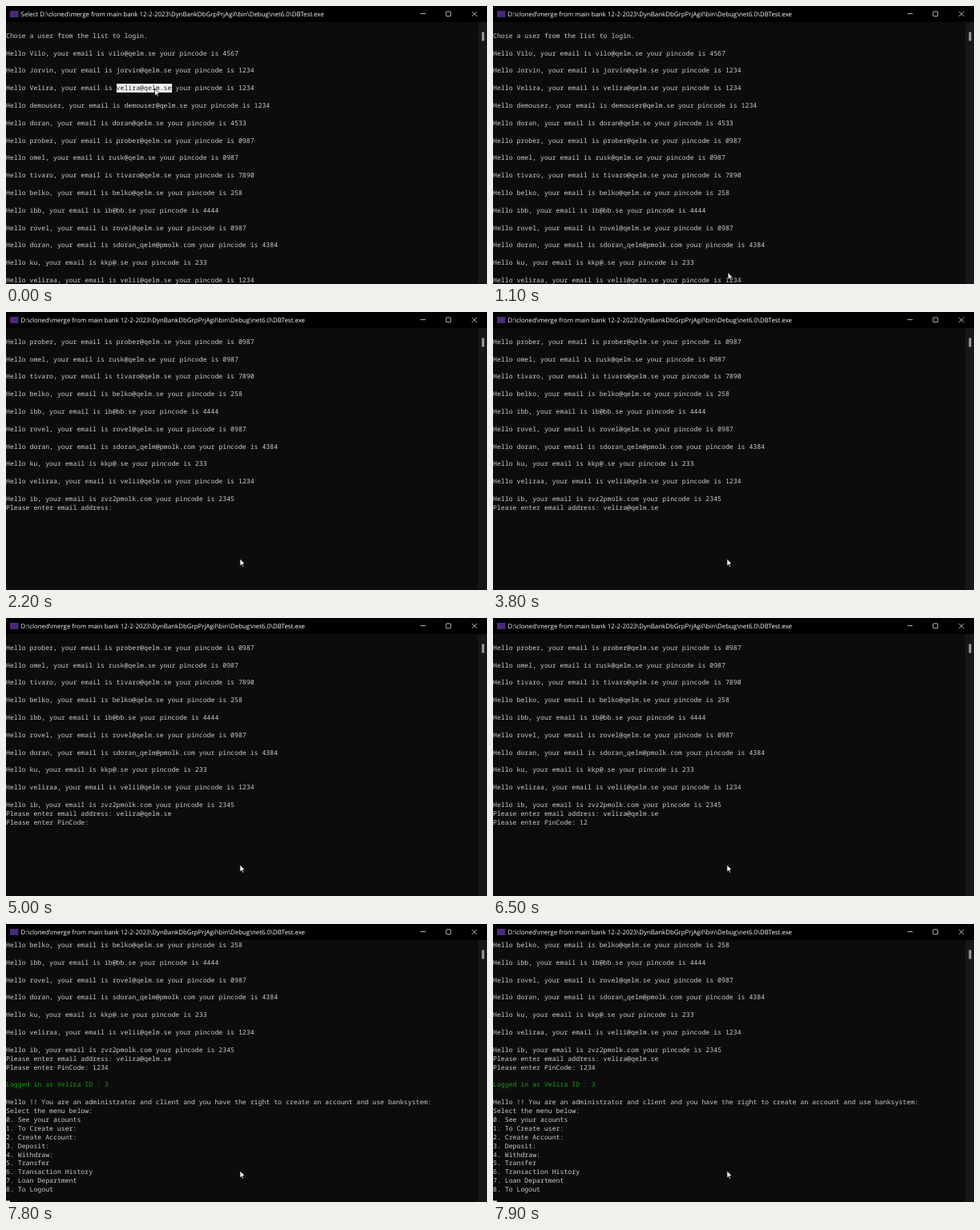
Animation of 600 by 347 pixels, one loop 8 s. Source, as an HTML page with a canvas:

```html
<!DOCTYPE html>
<html lang="en">
<head>
<meta charset="utf-8">
<title>Console login</title>
<style>
html, body { margin: 0; width: 100%; height: 100%; overflow: hidden; background: #0c0c0c; }
canvas { display: block; }
</style>
</head>
<body>
<canvas id="stage" width="600" height="347"></canvas>
<script>
const ctx = document.getElementById('stage').getContext('2d');
const LOOP = 8000, TICK = 100;
const COL = 4.914, ROW = 10.9, TOP = 20.4, BASE = 8.5, ROWS = 30;
const INK = '#cccccc', GREEN = '#13a10e';
const PATH = 'D:\\cloned\\merge from main bank 12-2-2023\\DynBankDbGrpPrjAgil\\bin\\Debug\\net6.0\\DBTest.exe';
const EMAIL = 'velira@qelm.se';
const MAIL_ROW = 32, PIN_ROW = 33, LOGIN_ROW = 35, MENU_ROW = 37;
const MAIL_ASK = 'Please enter email address: ', PIN_ASK = 'Please enter PinCode: ';

const users = [
  ['Vilo', 'vilo@qelm.se', '4567'],
  ['Jorvin', 'jorvin@qelm.se', '1234'],
  ['Velira', EMAIL, '1234'],
  ['demouser', 'demouser@qelm.se', '1234'],
  ['doran', 'doran@qelm.se', '4533'],
  ['prober', 'prober@qelm.se', '0987'],
  ['omel', 'rusk@qelm.se', '0987'],
  ['tivaro', 'tivaro@qelm.se', '7890'],
  ['belko', 'belko@qelm.se', '258'],
  ['ibb', 'ib@bb.se', '4444'],
  ['rovel', 'rovel@qelm.se', '0987'],
  ['doran', 'sdoran_qelm@pmolk.com', '4384'],
  ['ku', 'kkp@.se', '233'],
  ['veliraa', 'velii@qelm.se', '1234'],
  ['ib', 'zvz2pmolk.com', '2345']
];

const menu = [
  'Hello !! You are an administrator and client and you have the right to create an account and use banksystem:',
  'Select the menu below:',
  '0. See your acounts',
  '1. To Create user:',
  '2. Create Account:',
  '3. Deposit:',
  '4. Withdraw:',
  '5. Transfer',
  '6. Transaction History',
  '7. Loan Department',
  '8. To Logout'
];

// Each step: [start ms, value]
const scrollSteps = [[0, 0], [1600, 3], [1700, 6], [1900, 9], [2000, 12], [7600, 8], [7800, 19]];
const pinSteps = [[0, 0], [6000, 1], [6400, 2], [6800, 3], [7000, 4]];
// Caret is visible within these spans
const caretSpans = [[1700, 2200], [2800, 3300], [3400, 3800], [4400, 4900],
  [6000, 6200], [6400, 6500], [6800, 7000], [7600, 8000]];
// Mouse path: [ms, x, y]
const mouse = [[0, 185.5, 103], [100, 185.5, 103], [1100, 293, 332.5], [1400, 293, 332.5],
  [1900, 295.3, 313], [2200, 291.8, 308], [LOOP, 291.8, 308]];

const stepAt = (steps, t) => steps.filter(s => s[0] <= t).pop()[1];

function mouseAt(t) {
  const i = mouse.findIndex(p => p[0] > t);
  const [a, b] = [mouse[i - 1], mouse[i]];
  const u = (t - a[0]) / (b[0] - a[0]);
  const e = u * u * (3 - 2 * u);
  return [a[1] + (b[1] - a[1]) * e, a[2] + (b[2] - a[2]) * e];
}

function rect(x, y, w, h, color) {
  ctx.fillStyle = color;
  ctx.fillRect(x, y, w, h);
}

function write(text, row, color = INK, col = 0) {
  ctx.fillStyle = color;
  const y = TOP + row * ROW + BASE;
  [...text].forEach((ch, i) => {
    if (ch !== ' ') ctx.fillText(ch, (col + i) * COL, y);
  });
}

function screenLines(t) {
  const lines = [];
  const put = (row, text, color) => { lines[row] = { text, color }; };
  put(1, 'Chose a user from the list to login.');
  users.forEach(([name, mail, pin], i) =>
    put(3 + 2 * i, `Hello ${name}, your email is ${mail} your pincode is ${pin}`));
  put(MAIL_ROW, MAIL_ASK + (t >= 3400 ? EMAIL : ''));
  if (t >= 5000) put(PIN_ROW, PIN_ASK + '1234'.slice(0, stepAt(pinSteps, t)));
  if (t >= 7600) put(LOGIN_ROW, 'Logged in as Velira ID : 3', GREEN);
  if (t >= 7800) menu.forEach((text, i) => put(MENU_ROW + i, text));
  return lines;
}

function caretAt(t, lines) {
  if (t >= 7800) return [MENU_ROW + menu.length, 0];
  if (t >= 7600) return [MENU_ROW, 0];
  const row = t >= 5000 ? PIN_ROW : MAIL_ROW;
  return [row, lines[row].text.length];
}

function drawConsole(t) {
  const top = stepAt(scrollSteps, t);
  const lines = screenLines(t);
  ctx.font = '500 8.19px "Noto Sans Mono", "DejaVu Sans Mono", monospace';
  for (let r = 0; r < ROWS; r++) {
    const line = lines[top + r];
    if (line) write(line.text, r, line.color);
  }
  if (t < 200) {
    rect(Math.round(28 * COL), Math.round(TOP + 7 * ROW), Math.round(EMAIL.length * COL), 11, '#f3f3f3');
    write(EMAIL, 7, '#222222', 28);
  }
  if (caretSpans.some(([a, b]) => t >= a && t < b)) {
    const [row, col] = caretAt(t, lines);
    rect(col * COL, TOP + (row - top) * ROW + BASE + 0.4, COL, 2, '#f2f2f2');
  }
}

function drawFrame(t) {
  rect(0, 0, 600, 20, '#000000');
  rect(5, 6, 10.5, 8, '#4a2a78');
  ctx.font = '7.87px "Open Sans", "Noto Sans", sans-serif';
  ctx.fillStyle = '#ffffff';
  ctx.fillText((t < 200 ? 'Select ' : '') + PATH, 18.6, 12.7);

  ctx.strokeStyle = '#e8e8e8';
  ctx.lineWidth = 0.8;
  ctx.beginPath();
  ctx.moveTo(517, 9.6);
  ctx.lineTo(523.5, 9.6);
  ctx.moveTo(581.2, 6.8);
  ctx.lineTo(587.4, 13);
  ctx.moveTo(587.4, 6.8);
  ctx.lineTo(581.2, 13);
  ctx.roundRect(549, 6.9, 5.8, 5.9, 0.8);
  ctx.stroke();

  rect(589, 20, 11, 327, '#171717');
  rect(593.6, 32.5, 2.9, 11, '#9f9f9f');
}

function drawMouse(t) {
  const [x, y] = mouseAt(t);
  const shape = [[0, 0], [0, 9], [2, 7.2], [3.3, 10.2], [4.8, 9.5], [3.5, 6.6], [6.3, 6.4]];
  ctx.beginPath();
  shape.forEach(([dx, dy]) => ctx.lineTo(x + dx, y + dy));
  ctx.closePath();
  ctx.lineWidth = 0.8;
  ctx.strokeStyle = '#000000';
  ctx.fillStyle = '#ffffff';
  ctx.fill();
  ctx.stroke();
}

function draw(t) {
  ctx.textRendering = 'geometricPrecision';
  rect(0, 0, 600, 347, '#0c0c0c');
  drawConsole(t);
  drawFrame(t);
  drawMouse(t);
}

let shown = -1;
function loop() {
  const t = Math.floor((performance.now() % LOOP) / TICK) * TICK;
  if (t !== shown) draw(shown = t);
  requestAnimationFrame(loop);
}
loop();
</script>
</body>
</html>
```
